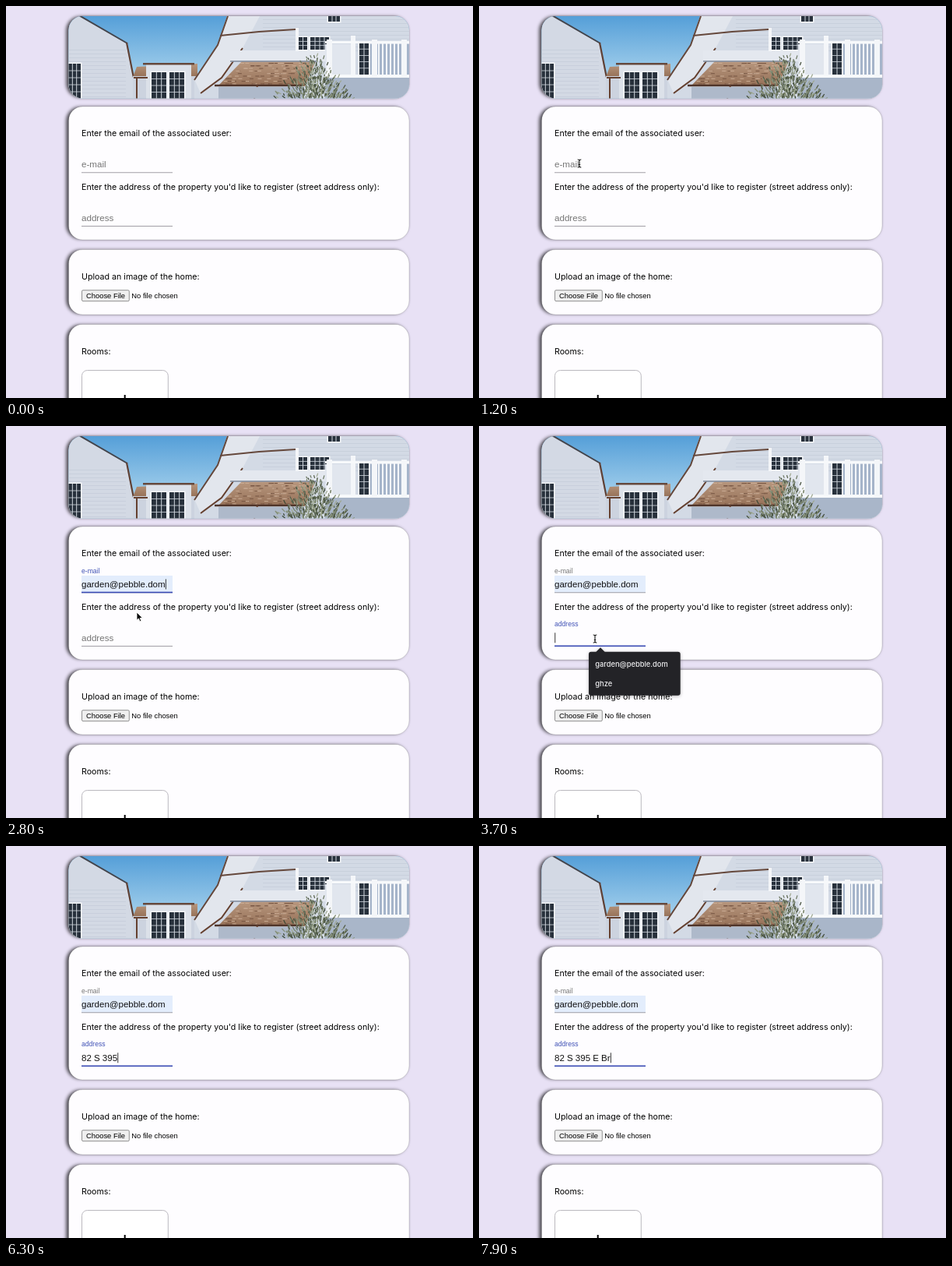
An HTML page that plays this animation: 600 by 503 pixels, repeating every 8 s.

```html
<!DOCTYPE html>
<html lang="en">
<head>
<meta charset="utf-8">
<title>Register a home</title>
<style>
  html, body { margin: 0; width: 100%; height: 100%; overflow: hidden; background: #e8e1f5; }
  svg { display: block; width: 600px; height: 503px; }
  text { font: 11.5px "Liberation Sans", Arial, sans-serif; fill: #111; white-space: pre; }
  text.body { font: 10.67px Inter, sans-serif; fill: #000; }
  text.file { font-size: 9.4px; fill: #000; }
  text.option { font: 500 9.3px Inter, sans-serif; fill: #eeeef0; }
  .shadow { fill: rgba(0, 0, 0, .68); filter: blur(2px); }
</style>
</head>
<body>
<svg viewBox="0 0 600 503">
  <defs>
    <linearGradient id="sky" x2="0" y2="1">
      <stop stop-color="#559fd8"/><stop offset=".65" stop-color="#9ccbea"/>
    </linearGradient>
    <linearGradient id="roof" x2="0" y2="1">
      <stop stop-color="#b8977e"/><stop offset="1" stop-color="#957057"/>
    </linearGradient>
    <clipPath id="frame"><rect x="80.5" y="13" width="437.5" height="105.5" rx="18"/></clipPath>
  </defs>
  <g id="cards"></g>
  <g id="photo" clip-path="url(#frame)"></g>
  <text class="body" x="97" y="167.3">Enter the email of the associated user:</text>
  <text class="body" x="97" y="236">Enter the address of the property you'd like to register (street address only):</text>
  <text class="body" x="97" y="351">Upload an image of the home:</text>
  <text class="body" x="97" y="447">Rooms:</text>
  <rect x="97.5" y="364.7" width="60.8" height="14" rx="1.5" fill="#efefef" stroke="#767676" stroke-width=".8"/>
  <text class="file" x="103" y="375">Choose File</text>
  <text class="file" x="161.3" y="375">No file chosen</text>
  <rect x="97.5" y="467.5" width="110.8" height="80" rx="7" fill="#fff" stroke="#b4b2b8" stroke-width=".9"/>
  <rect x="151.7" y="499" width="2" height="12"/>
  <g id="live"></g>
</svg>
<script>
const LOOP = 8000, TICK = 100, LEFT = 97, RIGHT = 214;
const MAIL = 'garden@pebble.dom', OPTIONS = [MAIL, 'ghze'], ADDRESS = '82 S 395 E Br';
const KEYS = [4600, 4800, 4900, 5400, 5600, 5800, 6000, 6200, 6600, 6800, 7100, 7500, 7700];
const MAIL_FOCUS = 1300, HOVER = 2200, PICK = 2800, ADDRESS_FOCUS = 3300;
// time, x, y of the pointer
const PATH = [[100, 78, 370], [500, 132, 214], [700, 132, 214], [1000, 129, 202], [1900, 129, 202],
  [2300, 166, 237], [2800, 168, 239], [3200, 149, 273]];

const clamp = v => Math.max(0, Math.min(1, v));
const ease = v => { v = clamp(v); return v * v * (3 - 2 * v); };
const mix = (a, b, k) => a + (b - a) * k;
const rect = (x, y, w, h, fill, extra = '') =>
  `<rect x="${x}" y="${y}" width="${w}" height="${h}" fill="${fill}" ${extra}/>`;
const poly = (points, fill) => `<polygon points="${points}" fill="${fill}"/>`;
const line = (points, color, width) =>
  `<polyline points="${points}" fill="none" stroke="${color}" stroke-width="${width}"/>`;
const text = (x, y, str, attrs = '') => `<text x="${x}" y="${y}" ${attrs}>${str}</text>`;

const pen = document.createElement('canvas').getContext('2d');
pen.font = '11.5px "Liberation Sans", Arial, sans-serif';

const card = (y, h) => rect(77.3, y + .5, 438.7, h - 1.5, '', 'rx="18" class="shadow"')
  + rect(80.5, y, 437.5, h, '#fefdff', 'rx="18" stroke="#000" stroke-opacity=".18" stroke-width=".7"');

function paneWindow(x, y, w, h, cols, rows) {
  let out = rect(x - 1.5, y - 1.5, w + 3, h + 3, '#f3f5f8') + rect(x, y, w, h, '#27303b');
  for (let i = 1; i < cols; i++) out += rect(x + w * i / cols - .5, y, 1, h, '#cfd5dd');
  for (let i = 1; i < rows; i++) out += rect(x, y + h * i / rows - .4, w, .8, '#cfd5dd');
  return out;
}

function siding(x, y, w, h, step) {
  let out = '';
  for (let v = y; v < y + h; v += step) out += rect(x, v, w, .5, '#bcc5d3');
  return out;
}

function drawPhoto() {
  let seed = 7;
  const rnd = () => (seed = seed * 16807 % 2147483647) / 2147483647;
  let out = rect(80, 13, 438, 106, 'url(#sky)');
  // left gable
  out += poly('80,13 95,13 156,48 164,92 164,119 80,119', '#d3d9e4') + siding(80, 56, 74, 62, 5)
    + line('92,11 156,48', '#43444b', 2) + line('155,47 164,92', '#5f4136', 2.2) + paneWindow(80, 74, 16, 45, 3, 5);
  // middle wing
  out += poly('163,91 168,78 246,74 246,91', 'url(#roof)') + rect(163, 90, 110, 29, '#ccd3df')
    + rect(180, 75, 58, 44, '#dce1e9') + rect(176, 73, 66, 2.5, '#65483c')
    + paneWindow(187, 85, 19, 34, 3, 4) + paneWindow(210, 85, 19, 34, 3, 4)
    + line('164,92 182,92', '#65402f', 2) + line('168,92 168,119', '#65402f', 2);
  // main house
  out += poly('242,119 242,94 272,50 284,13 518,13 518,119', '#d3dae5') + siding(330, 17, 188, 42, 5)
    + poly('250,112 277,92 304,54 326,13 284,13 272,50 242,94', '#e2e6ed')
    + line('242,95 272,50 285,13', '#65483c', 2) + line('250,112 277,92 304,54', '#65402f', 2)
    + line('275,38 325,33 372,30', '#65483c', 1.8);
  out += poly('272,103 303,71 398,71 384,103', 'url(#roof)');
  for (let i = 0; i < 110; i++) {
    const row = i % 9, y = 73 + row * 3.3;
    out += rect(303 - (y - 71) + rnd() * 85, y, 5, 1, rnd() < .5 ? '#765542' : '#c9ab94');
  }
  out += rect(288, 57, 122, 14, '#e4e8ef') + rect(288, 70, 112, 1.8, '#8d97a7')
    + line('268,102 380,102', '#4f352b', 2.5) + line('323,102 319,119', '#65402f', 2)
    + rect(273, 104, 110, 15, '#aeb9ca');
  out += paneWindow(376, 40, 11, 16, 2, 3) + paneWindow(391, 40, 24, 16, 4, 3)
    + paneWindow(414, 13, 15, 7, 3, 1) + rect(372, 28, 4, 30, '#f4f6f9');
  // balcony
  out += rect(410, 90, 108, 29, '#a9b6c9') + rect(410, 49, 34, 41, '#e1e6ee') + rect(468, 49, 50, 41, '#a5b4ca')
    + paneWindow(454, 47, 12, 41, 2, 5) + rect(443, 38, 6, 52, '#f4f6f9') + rect(410, 45, 108, 3, '#f7f9fb');
  for (let x = 478; x < 518; x += 5) out += rect(x, 48, 2, 42, '#f4f6f9');
  out += rect(410, 88, 108, 4, '#f7f9fb');
  for (const x of [412, 470, 508]) out += rect(x, 43, 7, 49, '#f4f6f9');
  // olive tree
  const greens = ['#525c45', '#6c7762', '#858f76', '#3d4836', '#9ea78f'];
  for (let i = 0; i < 520; i++) {
    const h = Math.sqrt(rnd()), x = 396 + (rnd() + rnd() - 1) * (12 + 43 * h), y = 64 + 56 * h;
    const dx = (x - 396) / 14 + rnd() * 3 - 1.5;
    out += line(`${x},${y} ${x + dx},${y - 2 - rnd() * 3}`, greens[i % 5], 1.2);
  }
  return out;
}

function field(y, name, t, focus, blur, value, filled) {
  const focused = t >= focus && t < blur, k = ease((t - focus) / 200);
  const color = focused ? '#3f51b5' : '#757575', half = (RIGHT - LEFT) / 2 * k;
  let out = filled ? rect(LEFT, y - 11, RIGHT - LEFT, 22, '#e3edfc') : '';
  out += rect(LEFT, y + 10.4, RIGHT - LEFT, .8, '#8b8990');
  if (focused) out += rect(LEFT + 58.5 - half, y + 9.7, half * 2, 1.6, '#3a4bb4');
  out += text(LEFT, mix(y + 4, y - 14.5, k), name, `style="font-size:${mix(11.6, 8.6, k)}px;fill:${color}"`);
  return out + text(LEFT, y + 4, value);
}

function caret(y, t, since, value) {
  return (t - since) % 1000 < 500 ? rect(LEFT + .3 + pen.measureText(value).width, y - 6.5, .9, 13, '#222') : '';
}

function popup(y, hover) {
  return `<g transform="translate(0 ${y})" style="filter:drop-shadow(0 1px 2px rgba(0,0,0,.3))">`
    + poly('149.5,19 156,12.5 162.5,19', '#232327') + rect(141, 18, 117.7, 56, '#232327', 'rx="3"')
    + (hover ? rect(141, 21.5, 117.7, 25, '#47474c') : '')
    + OPTIONS.map((s, i) => text(149.3, 37 + i * 25, s, 'class="option"')).join('') + '</g>';
}

function pointer(t, covered) {
  const i = PATH.findIndex(p => p[0] > t);
  const [t0, x0, y0] = PATH[i < 0 ? PATH.length - 1 : i - 1];
  const [t1, x1, y1] = i < 0 ? [t0 + 1, x0, y0] : PATH[i];
  const k = ease((t - t0) / (t1 - t0)), x = mix(x0, x1, k), y = mix(y0, y1, k);
  const inField = x > LEFT && x < RIGHT && (Math.abs(y - 203) < 10.5 || Math.abs(y - 272) < 10.5);
  const beam = 'M-2.3-5Q0-5 0-3.5Q0-5 2.3-5M0-3.5V3.5M-2.3 5Q0 5 0 3.5Q0 5 2.3 5M-1.2 1.5H1.2';
  const arrow = 'M0 0V10.3L2.4 8.1L4 11.9L5.8 11.1L4.2 7.5H7.4Z';
  const shape = inField && !covered
    ? `<path d="${beam}" fill="none" stroke="#fff" stroke-width="2.2"/><path d="${beam}" fill="none" stroke="#111" stroke-width="1.1"/>`
    : `<path d="${arrow}" fill="#000" stroke="#fff" stroke-width=".9"/>`;
  return `<g transform="translate(${x} ${y})">${shape}</g>`;
}

const live = document.getElementById('live');
document.getElementById('cards').innerHTML = card(13, 105.5) + card(129, 171) + card(312.5, 83.5) + card(408.5, 130);
document.getElementById('photo').innerHTML = drawPhoto();

function draw(t) {
  const typed = KEYS.filter(k => k <= t).length, value = ADDRESS.slice(0, typed);
  const mail = t >= HOVER ? MAIL : '', hover = t >= HOVER && t < PICK;
  let out = field(203, 'e-mail', t, MAIL_FOCUS, ADDRESS_FOCUS, mail, mail)
    + field(271.8, 'address', t, ADDRESS_FOCUS, LOOP, value, false);
  if (t >= ADDRESS_FOCUS) out += caret(271.8, t, typed ? KEYS[typed - 1] : ADDRESS_FOCUS, value);
  else if (t >= MAIL_FOCUS && !hover) out += caret(203, t, t >= PICK ? PICK : MAIL_FOCUS, mail);
  if (t >= MAIL_FOCUS + 100 && t < PICK) out += popup(203, hover);
  if (t >= ADDRESS_FOCUS + 300 && !typed) out += popup(271.8, false);
  if (t >= PATH[0][0] && !typed) out += pointer(t, hover);
  live.innerHTML = out;
}

let shown = -1;
function loop() {
  const t = Math.floor(performance.now() % LOOP / TICK) * TICK;
  if (t !== shown) draw(shown = t);
  requestAnimationFrame(loop);
}
loop();
</script>
</body>
</html>
```
